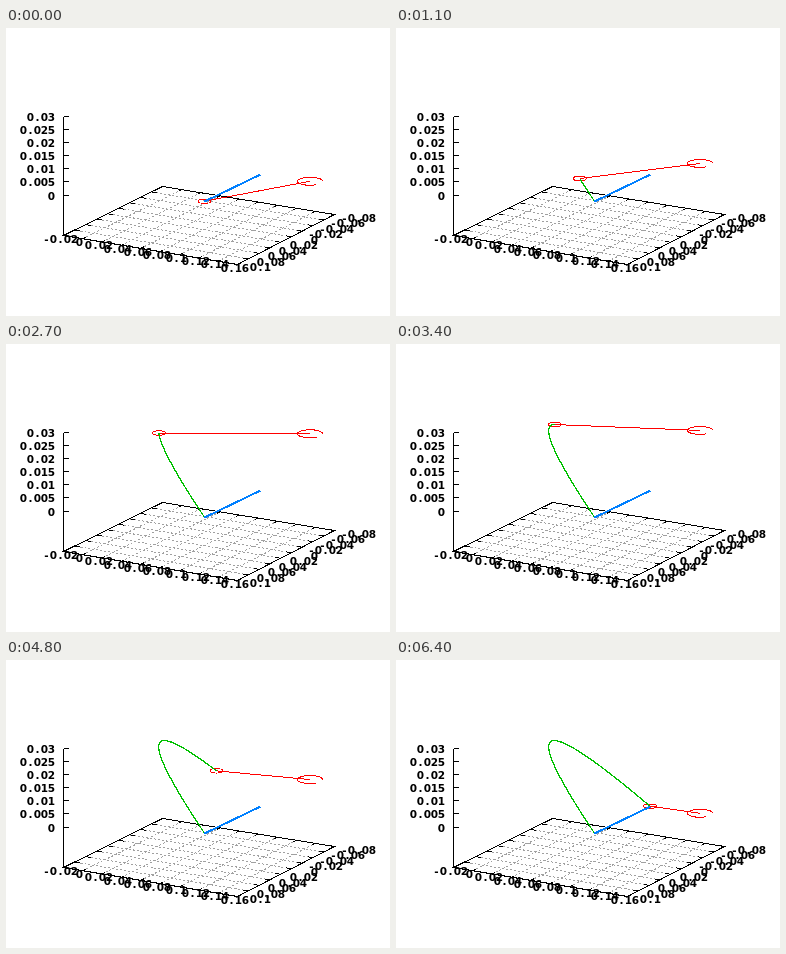
Write an HTML page that moves like this. It is 384 px wide and 288 px high and loops after 6500 ms.

```html
<!DOCTYPE html>
<html lang="en">
<head>
<meta charset="utf-8">
<title>Arc of a moving rod</title>
<style>
  html, body { margin: 0; width: 100%; height: 100%; overflow: hidden; background: #fff; }
  svg { display: block; width: 384px; height: 288px; }
  path, ellipse { fill: none; shape-rendering: crispEdges; }
  text { font: bold 10.5px "DejaVu Sans", sans-serif; text-anchor: middle; }
</style>
</head>
<body>
<svg viewBox="0 0 384 288">
  <g transform="translate(.5 .5)">
    <path id="grid" stroke="#a0a0a0" stroke-dasharray="2 2"/>
    <path id="axes" stroke="#000"/>
  </g>
  <g id="labels"></g>
  <g transform="translate(.5 .5)">
    <path id="rod" stroke="#f00"/>
    <ellipse id="ring" rx="6.5" ry="2.2" stroke="#f00"/>
    <path id="trail" stroke="#00c000" stroke-width="1.3"/>
    <path d="M198 173L254 146" stroke="#0080ff" stroke-width="2"/>
  </g>
</svg>
<script>
const FRAME_MS = 100, FRAMES = 65, CELLS = 9, CHAR = 7;
const left = [57, 207], front = [231, 236], right = [328, 186], back = [156, 158];
const el = id => document.getElementById(id);
const mix = (a, b, k) => a.map((v, i) => v + (b[i] - v) * k);
const line = (a, b) => `M${a}L${b}`;

// Characters sit on a fixed pitch, like a bitmap font; align is 0.5 for centred, 1 for right.
function label(value, [x, baseline], align) {
  const chars = [...String(value)];
  const start = Math.round(x - chars.length * CHAR * align);
  const text = document.createElementNS("http://www.w3.org/2000/svg", "text");
  text.setAttribute("x", chars.map((_, i) => start + CHAR * (i + 0.5)).join(" "));
  text.setAttribute("y", Math.round(baseline));
  text.textContent = chars.join("");
  el("labels").append(text);
}

function drawAxes() {
  let grid = "", axes = `M57 88V207M${left}L${front}L${right}L${back}Z`;
  for (let i = 0; i <= CELLS; i++) {
    const k = i / CELLS;
    const spans = [
      [mix(left, front, k), mix(back, right, k)],
      [mix(front, right, k), mix(left, back, k)]
    ];
    for (const [a, b] of spans) {
      if (i > 0 && i < CELLS) grid += line(a, b);
      axes += line(a, mix(a, b, 0.03)) + line(b, mix(b, a, 0.03));
    }
    label((2 * i - 2) / 100, mix([54, 215], [228.5, 243.5], k), 0.5);
    label((10 - 2 * i) / 100, mix([254.5, 243], [352.5, 194], k), 0.5);
  }
  for (let i = 0; i <= 6; i++) {
    const y = Math.floor(167 - i * 79 / 6);
    axes += `M57 ${y}h5`;
    label(i * 5 / 1000, [49, y + 5], 1);
  }
  el("grid").setAttribute("d", grid);
  el("axes").setAttribute("d", axes);
}

const progress = frame => (1 - Math.cos(Math.PI * frame / (FRAMES - 1))) / 2;
const lift = s => 4 * s * (1 - s);
const tip = s => [198 + 55.5 * s - 70.9 * lift(s), 172.7 - 27 * s - 78.6 * lift(s)];

function drawPose(frame) {
  const s = progress(frame), [x, y] = tip(s);
  const hubX = 303.5, hubY = 152.8 - 67.5 * lift(s);
  el("ring").setAttribute("cx", x);
  el("ring").setAttribute("cy", y);
  el("rod").setAttribute("d", line([x, y], [hubX, hubY]) +
    `M${hubX + 6.5} ${hubY + 3.4}A12.6 4 0 1 1 ${hubX + 12.6} ${hubY}`);
  const points = Array.from({ length: frame + 1 }, (_, i) => tip(progress(i)));
  el("trail").setAttribute("d", "M" + points.join("L"));
}

function tick() {
  drawPose(Math.floor(performance.now() / FRAME_MS) % FRAMES);
  requestAnimationFrame(tick);
}

drawAxes();
tick();
</script>
</body>
</html>
```
